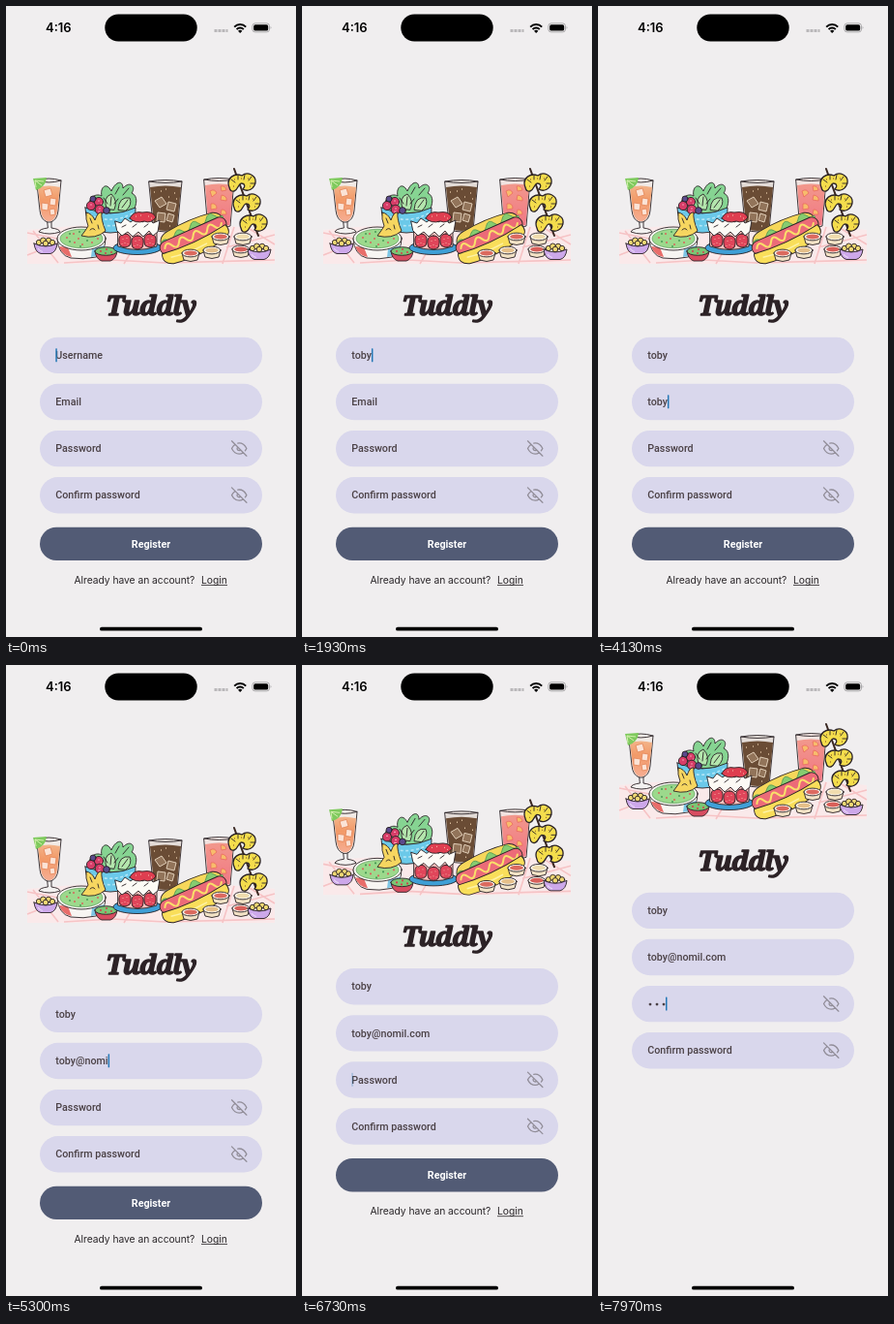
Write an HTML page that moves like this. It is 300 px wide and 651 px high and loops after 8000 ms.

```html
<!DOCTYPE html>
<html lang="en">
<head>
<meta charset="utf-8">
<title>Register</title>
<style>
  html, body { margin: 0; width: 100%; height: 100%; overflow: hidden; background: #f0eeef; }
  svg { display: block; width: 100%; height: 100%; }
  .field text { font: 500 10.7px Roboto, sans-serif; fill: #4a4045; }
  .action { font: 700 10.7px Roboto, sans-serif; fill: #fff; }
  .brand { font: italic 700 27.5px "Noto Serif", serif; letter-spacing: -1px; fill: #2c2226; stroke: #2c2226; stroke-width: 1.5; stroke-linejoin: round; }
  .note { font: 400 10.3px Inter, sans-serif; letter-spacing: -.04px; fill: #2a2629; }
  .clock { font: 600 13px Inter, sans-serif; }
  .ink { stroke: #2b2326; stroke-width: .9; stroke-linejoin: round; stroke-linecap: round; }
  .bold { stroke-width: 1.3; }
  .line { fill: none; }
</style>
</head>
<body>
<svg viewBox="0 0 300 651">
  <defs>
    <clipPath id="view"><rect id="viewArea" width="300" height="651"/></clipPath>
    <linearGradient id="tea" x2="0" y2="1"><stop stop-color="#f3b48a"/><stop offset=".4" stop-color="#f29a68"/><stop offset="1" stop-color="#f6ad92"/></linearGradient>
    <linearGradient id="punch" x2="0" y2="1"><stop stop-color="#f2988c"/><stop offset="1" stop-color="#f07684"/></linearGradient>
    <g id="snacks">
      <g class="ink" fill="#f0d873">
        <circle cx="-7" cy="-3" r="2.700"/><circle cx="-2.500" cy="-5" r="3"/><circle cx="3" cy="-5" r="2.800"/><circle cx="7" cy="-3" r="2.700"/><circle cy="-2" r="2.800"/>
      </g>
      <path class="ink" fill="#cda8ea" d="M-12-2Q0 4 12-2Q11 7 5 8.500H-5Q-11 7-12-2Z"/>
      <path class="line" d="M-8 3Q-6 6-3 6.500" stroke="#e9d7f6" stroke-width="1.200"/>
    </g>
    <g id="cup">
      <path class="ink" fill="#f3e3c6" d="M-9-1L-7 6Q0 9 7 6L9-1Z"/>
      <ellipse class="ink" fill="#faf6ee" cy="-1" rx="9" ry="3.900"/>
      <ellipse cy="-1" fill="currentColor" rx="6.800" ry="2.500"/>
    </g>
    <g id="shrimp">
      <path class="ink bold" fill="#f4dd4c" d="M-12 4C-16-6-6-11 1-8C7-13 16-8 15-1C14 6 7 9 2 6C5 3 4 0 0 0C-3 1-3 7-7 8Q-11 9-12 4Z"/>
      <path class="ink line" d="M-10-4L-6-1M-3-8L-3-4M4-9L3-4M11-7L8-3M15 0L10 0"/>
      <path d="M-8 3h1M-7-4h1M0-5h1M7-5h1M9 3h1" stroke="#a2762c" stroke-width="1.300"/>
    </g>
    <g id="berry">
      <path class="ink" fill="#e0455a" d="M0-7C7-7 7 0 5 5Q0 9-5 5C-7 0-7-7 0-7Z"/>
      <path d="M-2-2v1M2-3v1M0 2v1M-3 3v1M3 3v1" stroke="#f9c9b0" stroke-width=".8"/>
    </g>
    <g id="eye" transform="translate(232.800 10.200) scale(.7)" fill="none" stroke="#918d98" stroke-width="1.800" stroke-linecap="round" stroke-linejoin="round">
      <path d="M17.940 17.940A10.070 10.070 0 0 1 12 20c-7 0-11-8-11-8a18.450 18.450 0 0 1 5.060-5.940M9.900 4.240A9.120 9.120 0 0 1 12 4c7 0 11 8 11 8a18.500 18.500 0 0 1-2.160 3.190m-6.720-1.070a3 3 0 1 1-4.240-4.240M1 1l22 22"/>
    </g>
  </defs>

  <rect width="300" height="651" fill="#f0eeef"/>

  <g clip-path="url(#view)">
    <g id="page">
      <g id="food">
        <path fill="#fae9ea" d="M22 231Q150 218 278 231V266H22Z"/>
        <path class="line" stroke="#f6c3c5" stroke-width="1.600" d="M22 234L58 241M22 257L66 240M28 232L54 265M60 265L110 262L164 265M122 266L128 256M224 266L236 228M228 249L278 236M252 230L278 246M164 265L278 262"/>

        <!-- Iced tea -->
        <path class="ink" fill="#f3f1f0" d="M43 222h4v7q8 1 9 4q-11 4-22 0q1-3 9-4Z"/>
        <path class="ink" fill="#f1eae6" d="M32 180Q44 176 57 180L54 211Q53 221 46 223H43Q36 221 35 211Z"/>
        <path fill="url(#tea)" d="M33 187Q44 184 56 187L53 211Q52 220 46 222H43Q37 220 36 211Z"/>
        <path fill="#fbe3d6" stroke="#e58556" stroke-width=".8" d="M39 190l7-2l2 7l-7 2ZM46 198l6 1l-1 7l-6-1ZM37 203l7 1l-1 7l-6-1ZM45 210l5-1l1 6l-5 1Z"/>
        <path class="ink line" d="M32 180Q44 184 57 180"/>
        <path fill="#7fca5e" d="M28 178L42 177Q41 187 31 190Z"/>
        <path class="line" stroke="#d4efae" d="M30 180l7 5M30 180l1 7M30 180l9 1"/>

        <!-- Salad -->
        <g class="ink" fill="#86d492">
          <path d="M88 209C82 200 92 192 99 196C97 187 104 181 109 191C113 181 121 179 121 188C128 180 135 186 130 193C137 196 135 205 132 211Q110 218 88 209Z"/>
          <path fill="#b4e6ad" d="M104 209Q100 197 109 194Q116 201 112 210ZM116 210Q117 196 128 198Q131 205 124 211Z"/>
          <path class="line" d="M108 206L109 197M120 208L126 200M101 198L105 204M117 187L113 194M127 188L121 195M112 204l4-5M94 198l4 4"/>
        </g>
        <path class="ink" fill="#6bc9e9" d="M82 208Q108 220 134 208Q135 222 124 231Q108 237 92 231Q82 222 82 208Z"/>
        <path class="line" stroke="#b4e6f6" stroke-width="1.600" stroke-dasharray="3 2.500" d="M86 215Q108 226 131 214M89 222Q108 232 128 221"/>
        <g class="ink" fill="#d73d68">
          <circle cx="88" cy="206" r="4.600"/><circle cx="96" cy="202" r="4.600"/><circle cx="97" cy="210" r="4.800"/><circle cx="90" cy="199" r="3" fill="#5b4a8c"/><circle cx="104" cy="211" r="3.400" fill="#5b4a8c"/>
        </g>
        <path d="M87 205h2M95 201h2M96 209h2M95 212h3M98 204h1" stroke="#f49bb0" stroke-width="1.200"/>

        <!-- Cola -->
        <path class="ink" fill="#e3dcd8" d="M148 181Q165 178 182 181L177 231Q165 235 153 231Z"/>
        <path fill="#6a4c35" d="M149 187Q165 184 181 187L176.500 230Q165 234 153.500 230Z"/>
        <path fill="#92745a" stroke="#ead9c2" stroke-width=".9" d="M154 201l7-4l5 7l-7 4ZM168 202l8 2l-2 8l-8-2ZM157 213l8 1l-1 9l-8-1ZM168 214l6 2l-2 7l-6-2Z"/>
        <path d="M153 192h1M174 193h1M168 197h1M160 191h1M176 199h1M165 189h1M157 227h1M169 227h1" stroke="#d8bb9a" stroke-width="1.500"/>
        <path class="ink line" d="M148 181Q165 184 182 181"/>

        <!-- Punch -->
        <path class="ink" fill="#f1e3e0" d="M205 179Q220 176 236 179L232 227Q220 231 209 227Z"/>
        <path fill="url(#punch)" d="M206 185Q220 182 235 185L231.500 226Q220 230 209.500 226Z"/>
        <path class="ink line" d="M205 179Q220 182 236 179"/>
        <path fill="#f8bc6c" stroke="#e8645c" stroke-width=".7" d="M211 191q5-3 7 2l-5 4ZM223 195q6 1 5 6l-6-1ZM212 204q6-1 6 5l-6 1ZM222 186q5-1 6 4l-5 1ZM223 210q5 0 5 5l-6 0Z"/>

        <!-- Skewer -->
        <path d="M236 168L261 237" stroke="#3a2822" stroke-width="2" stroke-linecap="round"/>
        <use href="#shrimp" x="243" y="183"/>
        <use href="#shrimp" x="248" y="204"/>
        <use href="#shrimp" x="255" y="225"/>

        <!-- Dip with chip -->
        <path class="ink" fill="#f7f5f2" d="M53 240Q54 257 67 260Q80 262 93 259Q103 254 103 239Z"/>
        <path fill="#e86d6a" d="M55 248l9 1l4 10q-10-2-13-11Z"/>
        <path fill="#7cc5e4" d="M89 251l13-4q-3 11-14 12Z"/>
        <ellipse class="ink" cx="78" cy="240" rx="25" ry="12" fill="#f9f7f2"/>
        <ellipse cx="78" cy="240" rx="22" ry="9.700" fill="#9cd98c" stroke="#5b9c5c" stroke-width=".7"/>
        <path d="M62 239h2M69 235h2M70 244h2M78 246h2M88 244h2M94 240h2M74 240h2M84 235h2" stroke="#d9665f" stroke-width="1.600"/>
        <path d="M65 243h2M65 235h2M75 233h2M83 242h2M92 236h2M76 248h2" stroke="#4a9b57" stroke-width="1.600"/>
        <path class="ink" fill="#f6d660" d="M83 213Q89 214 92 221Q95 212 99 213Q98 220 103 232Q93 241 78 237Q82 232 85 227Q82 220 83 213Z"/>
        <path class="ink line" d="M87 231q3-3 5 0M95 226l1 4M87 219l2 5"/>

        <!-- Salsa -->
        <path class="ink" fill="#d84c60" d="M92 253Q103 258 115 253Q114 261 108 263H99Q93 261 92 253Z"/>
        <ellipse class="ink" cx="103.500" cy="253" rx="11.500" ry="4.300" fill="#7cc574"/>
        <path d="M97 253h2M103 251h2M108 254h2M102 255h2" stroke="#d33f4e" stroke-width="1.600"/>

        <!-- Cake -->
        <ellipse class="ink" cx="136" cy="249.500" rx="25" ry="7" fill="#3f9fd6"/>
        <path class="ink" fill="#f8c0bd" d="M116 228H156V248Q136 255 116 248Z"/>
        <use href="#berry" x="123" y="242"/><use href="#berry" x="136" y="244"/><use href="#berry" x="149" y="242"/>
        <path class="ink" fill="#fcfaf5" d="M113 222L119 224L123 219L129 223L135 218L141 223L148 219L152 224L159 221L157 233L152 237L148 232L142 238L137 233L131 238L126 233L120 237L115 232Z"/>
        <path class="ink line" d="M120 228l4-2M131 228l4-3M143 228l4-3"/>
        <path class="ink" fill="#df3e50" d="M128 219Q132 211 141 213Q152 211 155 218Q150 225 143 222Q134 225 128 219Z"/>
        <path d="M134 217h1M139 216h1M147 217h1M150 219h1" stroke="#f9c9b0"/>

        <!-- Hot dog -->
        <g transform="translate(194 238) rotate(-24)">
          <path class="ink" fill="#f6d75a" d="M-34-4Q-34-15-22-16Q4-19 27-15Q36-12 35-3Z"/>
          <path fill="#86cc70" stroke="#4f9550" stroke-width=".7" d="M-35-6q5-6 9-2t9-2t9 0t9-1t9 0t9 0t9-1t8 4L36 5L-36 7Z"/>
          <rect class="ink" x="-37" y="-8" width="74" height="14" rx="7" fill="#ec6b78"/>
          <path class="line" stroke="#f9df6a" stroke-width="2" stroke-linecap="round" d="M-32-1q4-7 8 0t8 0t8 0t8 0t8 0t8 0t8 0t8 0"/>
          <path class="ink" fill="#f9de5a" d="M-37 3Q-2 8 35 2Q39 11 29 15Q0 22-30 17Q-41 13-37 3Z"/>
          <path class="line" stroke="#fdf2a4" stroke-width="1.600" d="M-30 10Q-10 14 10 12"/>
        </g>

        <use href="#cup" x="222" y="239" color="#dc6a60"/>
        <use href="#cup" x="245" y="239" color="#f0dcae"/>
        <use href="#cup" x="213" y="253" color="#e6c08a"/>
        <use href="#cup" x="243" y="252" color="#d9605a"/>
        <use href="#cup" x="191" y="256" color="#db6a5e"/>
        <use href="#snacks" x="41" y="247"/>
        <use href="#snacks" x="262" y="253"/>
      </g>

      <text class="brand" x="150" y="319" text-anchor="middle">Tuddly</text>
      <g id="fields"></g>
      <rect x="35" y="537.700" width="230" height="34.400" rx="17.200" fill="#525b75"/>
      <text class="action" x="150" y="559" text-anchor="middle">Register</text>
      <text class="note" x="70.500" y="596">Already have an account?</text>
      <text class="note" x="202" y="596">Login</text>
      <rect x="202" y="597" width="27" height=".8" fill="#2a2629"/>
      <rect id="caret" width="1.500" height="14" rx=".5" fill="#2478b6"/>
    </g>
  </g>

  <text class="clock" x="41" y="27">4:16</text>
  <rect x="102.300" y="8.500" width="95.400" height="28" rx="14"/>
  <path d="M215.500 25.500h14" stroke="#b9b7b9" stroke-width="3" stroke-dasharray="3 1"/>
  <g fill="none" stroke="#000" stroke-width="2"><path d="M236.200 21.600a8.500 8.500 0 0 1 12 0M238.600 24.100a5 5 0 0 1 7.200 0"/><path fill="#000" stroke="none" d="M240 25.700a3.200 3.200 0 0 1 4.400 0L242.200 28Z"/></g>
  <rect x="254.900" y="17.900" width="17.600" height="9" rx="2.800" fill="none" stroke="#99979a" stroke-width=".8"/>
  <rect x="256.200" y="19.200" width="15" height="6.400" rx="1.700"/>
  <path d="M273.700 20.800q1.600 1.600 0 3.200Z" fill="#99979a"/>
  <rect x="97" y="640.800" width="106" height="3.800" rx="1.900"/>
</svg>
<script>
const LOOP = 8000, LEFT = 51.3, TOP = 341.7, PITCH = 48.1, DOT = 7;
const $ = id => document.getElementById(id);
const clamp = v => Math.max(0, Math.min(1, v));

// Field contents: [time, value]; a number counts hidden characters.
const typed = [
  [[1870, 'to'], [1930, 'toby']],
  [[2870, 't'], [3170, 'tb'], [3370, 't'], [3600, 'to'], [3730, 'tob'], [3870, 'toby'],
   [4200, 'toby@'], [4470, 'toby@n'], [4870, 'toby@no'], [5030, 'toby@nom'], [5300, 'toby@nomi'],
   [5400, 'toby@nomil'], [5570, 'toby@nomil.'], [5670, 'toby@nomil.c'], [5730, 'toby@nomil.co'], [5800, 'toby@nomil.com']],
  [[7570, 1], [7730, 2], [7970, 3]],
  []
];
const focus = [[0, 0], [2400, 1], [6720, 2]];
const fades = [[430, 0], [730, 1], [1100, 0], [1370, 1], [2300, 0], [2400, 1], [6630, 0], [6720, 1], [7300, 0], [7570, 1]];

const at = (list, t, first) => list.reduce((v, [time, next]) => t >= time ? next : v, first);

const labels = ['Username', 'Email', 'Password', 'Confirm password'];
$('fields').innerHTML = labels.map((label, i) => `
  <g class="field" transform="translate(0 ${TOP + PITCH * i})">
    <rect x="35" width="230" height="37.4" rx="18.7" fill="#d9d7ec"/>
    <text x="${LEFT}" y="22.4">${label}</text>
    <g fill="#4a4045">${[0, 1, 2].map(n => `<circle cx="${54 + DOT * n}" cy="19.200" r="1.450"/>`).join('')}</g>
    ${i > 1 ? '<use href="#eye"/>' : ''}
  </g>`).join('');
const fields = [...document.querySelectorAll('.field')].map(el => ({
  text: el.querySelector('text'), dots: [...el.querySelectorAll('circle')]
}));

// Returns the width of the entered value.
function fill(i, t) {
  const value = at(typed[i], t, ''), { text, dots } = fields[i];
  const count = typeof value === 'number' ? value : 0;
  text.textContent = count ? '' : value || labels[i];
  dots.forEach((dot, n) => dot.setAttribute('opacity', n < count ? 1 : 0));
  return count ? count * DOT - 2.3 : value ? text.getComputedTextLength() : 0;
}

function render(t) {
  const widths = fields.map((_, i) => fill(i, t));
  const active = at(focus, t, 0);
  const alpha = fades.reduce((a, [start, to]) => a + (to - a) * clamp((t - start) / 130), 1);
  const caret = $('caret');
  caret.setAttribute('x', LEFT + widths[active]);
  caret.setAttribute('y', TOP + PITCH * active + 11.5);
  caret.setAttribute('opacity', alpha);

  // The keyboard area rises and recentres the form.
  const rise = 226 * (1 - (1 - clamp((t - 6690) / 245)) ** 2);
  $('page').setAttribute('transform', `translate(0 ${-Math.max(0, (rise - 12) / 2)})`);
  $('viewArea').setAttribute('height', 651 - rise);
}

const start = performance.now();
function tick() {
  render((performance.now() - start) % LOOP);
  requestAnimationFrame(tick);
}
tick();
</script>
</body>
</html>
```
